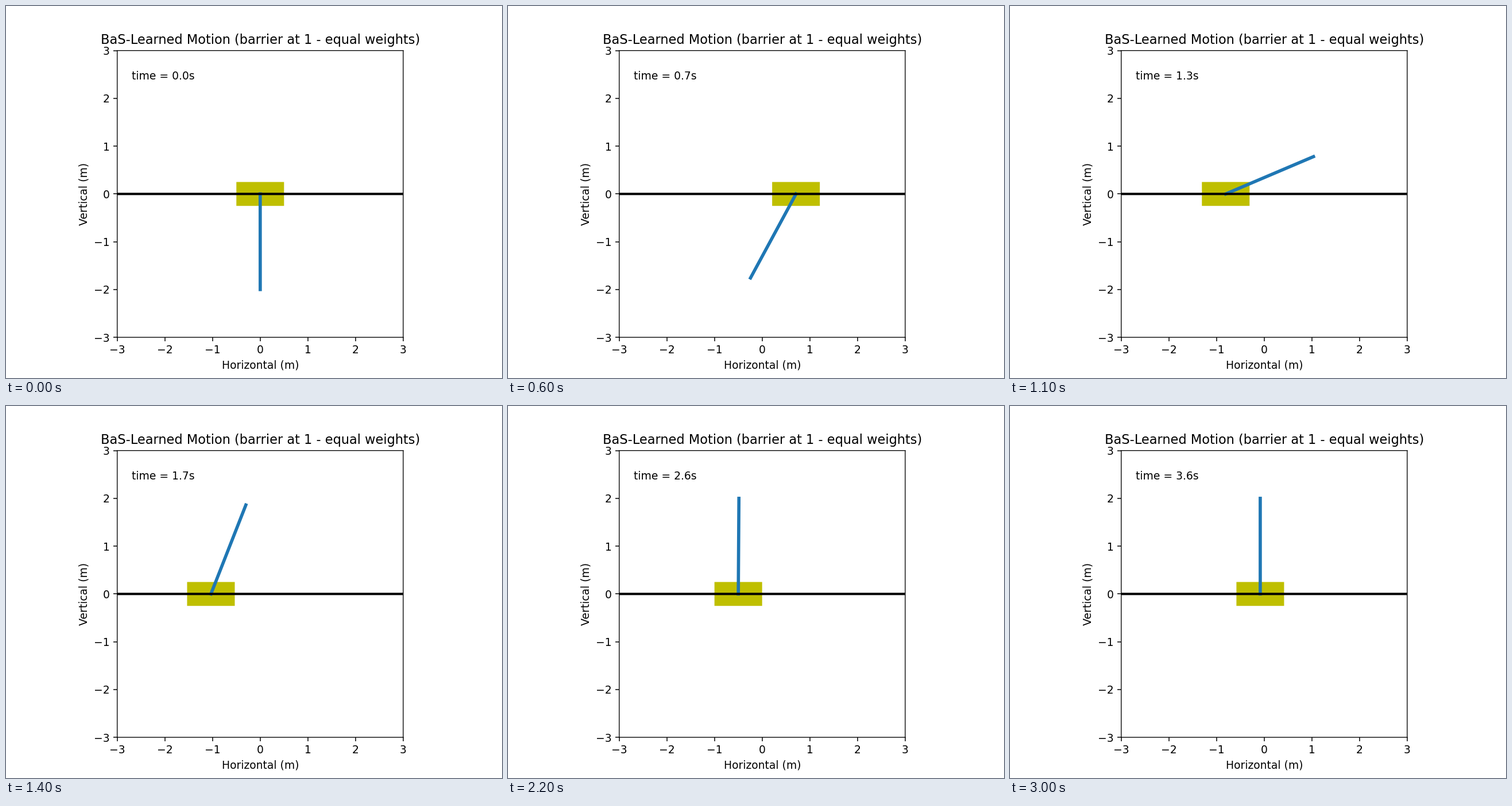
Animation, 864 px wide and 648 px high, one loop 3.1 s. Source, as a matplotlib script:

```python
import numpy as np
import matplotlib.pyplot as plt
from matplotlib.animation import FuncAnimation
from matplotlib.patches import Rectangle

FRAMES = 31
INTERVAL = 100          # ms between drawn frames
DT = 0.12               # simulated seconds per frame
CART_W, CART_H = 1.0, 0.5
POLE = 2.0

RIGHT_PEAK, RIGHT_AT = 0.71, 5.9       # cart turning points: metres, frame
LEFT_PEAK, LEFT_AT = -1.05, 12.63


def ease(start, end, u):
    return start + (end - start) * (1 - np.cos(np.pi * u)) / 2


def bump(t, center, width):
    return np.exp(-((t - center) / width) ** 2)


def cart_position(t):
    """Push right, pull hard left, then drift back to the middle."""
    if t < RIGHT_AT:
        return ease(0, RIGHT_PEAK, t / RIGHT_AT)
    if t < LEFT_AT:
        return ease(RIGHT_PEAK, LEFT_PEAK, (t - RIGHT_AT) / (LEFT_AT - RIGHT_AT))
    return LEFT_PEAK * bump(t, LEFT_AT, 10.9)


def pole_angle(t):
    """Angle from hanging: back swing, swing-up, slight overshoot."""
    swing_up = np.pi / (1 + np.exp((9.16 - t) / 2.39))
    back_swing = 1.159 * bump(t, 6.07, 3.588)
    overshoot = 0.034 * bump(t, 25, 2.5)
    return swing_up - back_swing + overshoot


plt.rcParams["font.family"] = "DejaVu Sans"
fig = plt.figure(figsize=(6.4, 4.8), dpi=135)
# Plot box given on a 640 x 480 grid.
ax = fig.add_axes([143.5 / 640, 52.5 / 480, 369 / 640, 370 / 480],
                  xlim=(-3, 3), ylim=(-3, 3))
ax.set_xticks(range(-3, 4))
ax.set_yticks(range(-3, 4))
ax.set_title("BaS-Learned Motion (barrier at 1 - equal weights)")
ax.set_xlabel("Horizontal (m)")
ax.set_ylabel("Vertical (m)")

cart = ax.add_patch(Rectangle((0, -CART_H / 2), CART_W, CART_H,
                              facecolor="y", edgecolor="none"))
pole, = ax.plot([], [], color="C0", lw=3, solid_capstyle="projecting")
track, = ax.plot([-3, 3], [0, 0], color="k", lw=2.15)
clock = ax.text(0.05, 0.9, "", transform=ax.transAxes)

# Keep sub-pixel positions so edges stay soft.
for artist in (cart, pole, track, *ax.spines.values()):
    artist.set_snap(False)
for spine in ax.spines.values():
    spine.set_linewidth(0.72)


def draw(i):
    x, angle = cart_position(i), pole_angle(i)
    cart.set_x(x - CART_W / 2)
    pole.set_data([x, x + POLE * np.sin(angle)], [0, -POLE * np.cos(angle)])
    clock.set_text(f"time = {i * DT:.1f}s")
    return cart, pole, clock


anim = FuncAnimation(fig, draw, frames=FRAMES, interval=INTERVAL,
                     repeat=True, repeat_delay=0, blit=False)
plt.show()
```
